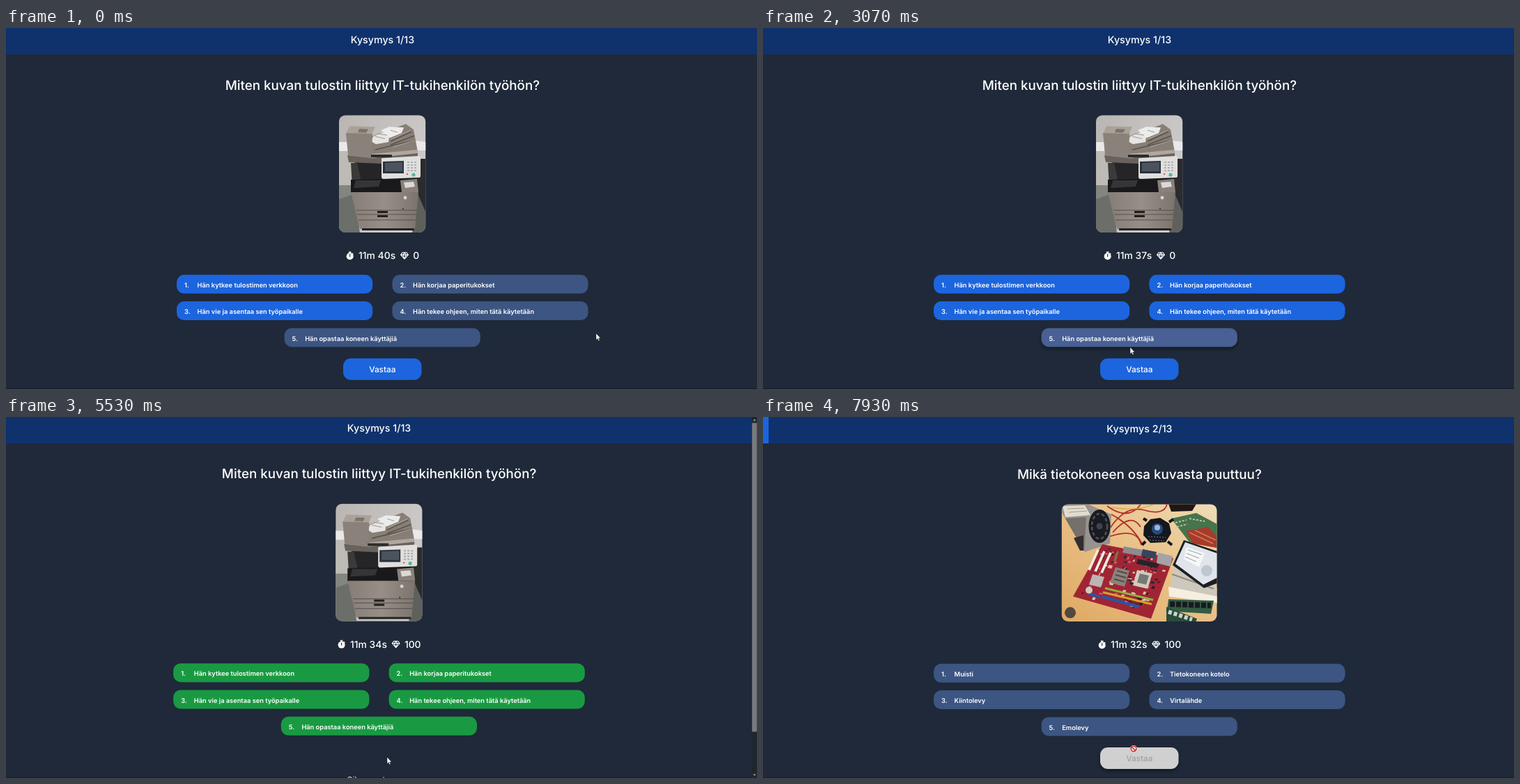
Recreate the animation shown at these times as an HTML page. Size 1078 by 519 pixels, loop 8000 ms.

```html
<!DOCTYPE html>
<html lang="fi">
<head>
<meta charset="utf-8">
<title>Kysymys</title>
<style>
  html, body { margin: 0; width: 100%; height: 100%; overflow: hidden; background: #1f2939; }
  svg { display: block; width: 100%; height: 100%; }
  text { font-family: Inter, "Open Sans", sans-serif; font-weight: 500; fill: #fff; text-rendering: geometricPrecision; }
  .mid { text-anchor: middle; }
  .opt { font-size: 9.28px; font-weight: 600; }
  .stat { font-size: 13.9px; }
</style>
</head>
<body>
<svg id="stage" viewBox="0 0 1078 519">
  <defs>
    <filter id="soft" x="-20%" y="-60%" width="140%" height="240%"><feGaussianBlur stdDeviation="2.8"/></filter>
    <clipPath id="clipA"><rect x="478" y="125.4" width="124.2" height="168.6" rx="9"/></clipPath>
    <clipPath id="clipB"><rect x="428.8" y="125.4" width="222.7" height="168.6" rx="9"/></clipPath>
    <linearGradient id="wall" x2="1" y2=".6"><stop stop-color="#b9b5b2"/><stop offset="1" stop-color="#cfcdcc"/></linearGradient>
    <linearGradient id="case" x2="1"><stop stop-color="#857d76"/><stop offset=".5" stop-color="#978f87"/><stop offset="1" stop-color="#7b746d"/></linearGradient>
    <linearGradient id="wood" x2="1" y1="1" y2="0"><stop stop-color="#dfa862"/><stop offset=".6" stop-color="#eac48d"/><stop offset="1" stop-color="#efdcb6"/></linearGradient>
  </defs>

  <rect width="1078" height="519" fill="#1f2939"/>
  <rect y="518" width="1078" height="1" fill="#151c28"/>
  <rect width="1078" height="38" fill="#0f326d"/>
  <rect id="progress" height="38" fill="#1c65de"/>

  <g id="page">
    <text id="head" class="mid" x="540.4" y="22" font-size="14.25"/>
    <text id="title" class="mid" x="540.4" y="89" font-size="18.8"/>

    <g id="photoA" clip-path="url(#clipA)">
      <rect x="478" y="125" width="125" height="170" fill="url(#wall)"/>
      <path d="M478 164h14v13h-14zM588 162l15 2v12h-15z" fill="#e9e9ea"/>
      <path d="M478 178h22v50h-22z" fill="#bebab6"/>
      <path d="M478 226h22l8 69h-30z" fill="#6c6f69"/>
      <path d="M589 236h14v59h-20z" fill="#5f605c"/>
      <path d="M478 226h20l3 12-23 8z" fill="#838680"/>
      <path d="M594 188h9v78l-13-30z" fill="#2b2b2e"/>
      <path d="M501 190h92l-2 48h-93z" fill="#252527"/>
      <path d="M495 194h9l5 22-12 12z" fill="#3c3a39"/>
      <path d="M524 156l50-18 11 8 6 32-66 8z" fill="#877f76"/>
      <path d="M552 163l30-14M552 168l34-13M530 175l58-14" stroke="#59534d" stroke-width="1.6"/>
      <path d="M552 160l29-13M556 171l32-10" stroke="#b1a99f"/>
      <path d="M527 156l14-6 10 2-2 12-18 3-7-4z" fill="#e6e5e3"/>
      <path d="M538 147l12-5 21 1-3 8-17 7z" fill="#ececea"/>
      <path d="M530 156l14 3M533 152l14 2M552 147l10 3" stroke="#9b9894" fill="none"/>
      <path d="M493 141l37 1-5 11-37-1z" fill="#aaa198"/>
      <path d="M507 145l13 .5-3 5-12-.5z" fill="#7b746d"/>
      <path d="M488 151l38 1-1 35-34-4z" fill="#8a827a"/>
      <path d="M525 181l66-6v5l-66 7z" fill="#b0a89e"/>
      <path d="M490 183l35 4 66-7v6l-52 6v3l-47-2z" fill="#69625c"/>
      <path d="M524 182h30v4h-30z" fill="#2d2c2c"/>
      <path d="M495 218l92-2 5 21h-97z" fill="#19191b"/>
      <path d="M502 219l36 0-3 9-36 2z" fill="#353537"/>
      <path d="M495 236h97l-5 53h-79z" fill="url(#case)"/>
      <path d="M566 219l24-2 2 19h-24z" fill="#898179"/>
      <path d="M571 222l14-1 2 7-14 2z" fill="#dad9d8"/>
      <path d="M503 262h87M504 268h85M506 276h82" stroke="#514b47" stroke-width=".9"/>
      <path d="M533 263h15v3h-15zM533 269h15v3h-15z" fill="#1f1e1e"/>
      <path d="M511 288h75v3h-75z" fill="#242424"/>
      <circle cx="573" cy="244" r="2.4" fill="#d8d5d1"/>
      <circle cx="570" cy="260" r="1.1" fill="#333"/>
      <path d="M539 188q0-1 2-1l51-3q3 0 3 2v27q0 2-2 2l-51 2q-3 0-3-3z" fill="#e0dfde"/>
      <path d="M541 192l30-1v18h-30z" fill="#2c323b"/>
      <path d="M544 194l25-1v13h-25z" fill="#4b535e"/>
      <path d="M576 193h13M576 197h13M576 201h13M576 205h13" stroke="#a3a3a4" stroke-width="1.6" stroke-dasharray="3 2"/>
      <circle cx="585" cy="211" r="2.6" fill="#52b999"/>
      <circle cx="576" cy="210" r="1.2" fill="#c66c5a"/>
    </g>

    <g id="photoB" clip-path="url(#clipB)">
      <rect x="428" y="125" width="225" height="170" fill="url(#wood)"/>
      <path d="M582 125h40l-6 10-30 1z" fill="#1f1715"/>
      <g fill="none" stroke="#b3302a" stroke-width="1.8">
        <path d="M494 128q30 22 48-2M498 160q22-34 50-26t32-9M497 172q40-14 46 12M500 140q30 16 44 42M502 166q26-30 40-8"/>
        <path d="M500 130q34 6 60-4" stroke="#d3a53e" stroke-width="1.2"/>
      </g>
      <path d="M428 126h40l32 14-2 42-36 12-34-58z" fill="#97938f"/>
      <path d="M430 128l32-1 8 14-36 3z" fill="#e2dccf"/>
      <path d="M437 132l24-1M439 137l26-2" stroke="#a39a8c"/>
      <path d="M434 146l30-2-3 49z" fill="#776f69"/>
      <path d="M446 174l14-4v22h-5z" fill="#332e2e"/>
      <ellipse cx="483" cy="157" rx="15.5" ry="24" fill="#191b20"/>
      <ellipse cx="483" cy="157" rx="11" ry="18" fill="none" stroke="#4b505a" stroke-width="2.5" stroke-dasharray="5 3"/>
      <circle cx="483" cy="157" r="4.5" fill="#3e434d"/>
      <path d="M586 146l36-8 30 16v34l-40-8z" fill="#47744c"/>
      <path d="M592 152l16-4M594 158l15-4M612 146l22 4" stroke="#b9c4a0" stroke-width="2" stroke-dasharray="3 2"/>
      <path d="M607 164l32-6 12 14v16l-34-6z" fill="#a83a2b"/>
      <path d="M612 166l34 16M620 163l30 14" stroke="#d17a56" stroke-width="1.5"/>
      <path d="M547 157l9-10 14-2 13 8 3 14-8 13-22 1-10-11z" fill="#14171d"/>
      <path d="M551 149l-5-3M583 151l6-4M549 179l-5 5M581 179l6 5" stroke="#14171d" stroke-width="4"/>
      <circle cx="566" cy="161" r="8" fill="#264a80"/>
      <circle cx="566" cy="159" r="4" fill="#9fb6cd"/>
      <path d="M553 172l25 1M555 177l21 1" stroke="#5a5f68" stroke-width="1.5" stroke-dasharray="2 2"/>
      <path d="M592 211l60 34v24l-70-11z" fill="#cdc8be"/>
      <path d="M587 226l60 21" stroke="#958b7c" stroke-width="2"/>
      <path d="M582 244l70 14v9l-69-9z" fill="#f6efdf"/>
      <path d="M604 177l48 16v46l-19 7-45-33z" fill="#1b1f25"/>
      <path d="M606 180l46 16v35l-20 10-40-30z" fill="#dfe5ea"/>
      <path d="M608 187l26 9-8 20-22-12z" fill="#f6f7f7"/>
      <path d="M610 191l20 7M608 196l18 7M606 201l16 7" stroke="#a1a8af" stroke-width="1.2"/>
      <circle cx="637" cy="221" r="8" fill="#bec7cf"/>
      <path d="M487 183l102 20-32 87-112-32z" fill="#a02534"/>
      <g id="parts" transform="matrix(1.02 .2 -.37 .79 487 183)"></g>
      <g stroke="#f1ece1" stroke-width="3.6">
        <path d="M481 191l-13 29M490 193l-13 29M499 195l-13 29"/>
        <path d="M509 193l-4 14" stroke="#8d6b43"/>
      </g>
      <path d="M518 186l27 5-2 9-27-5z" fill="#8f8990"/>
      <path d="M545 190l20 4-2 10-20-4z" fill="#36435e"/>
      <path d="M567 195l21 5-3 15-20-5z" fill="#a4a3a5"/>
      <path d="M538 204l28 6-2 7-28-6z" fill="#27242b"/>
      <path d="M506 216l20 5-7 23-21-6z" fill="#8c8179"/>
      <path d="M508 221l15 4M506 227l15 4M504 233l15 4" stroke="#524a49" stroke-width="2"/>
      <path d="M537 220l22 5-7 22-21-5z" fill="#d3cbbb"/>
      <path d="M541 225l13 3-4 13-13-3z" fill="#777"/>
      <path d="M473 226l17 4-5 15-17-4z" fill="#bcb5b1"/>
      <path d="M491 246l69 17" stroke="#8fb33c" stroke-width="3"/>
      <path d="M488 252l70 17" stroke="#d6a12e" stroke-width="3"/>
      <path d="M486 258l54 15M468 254l16 5" stroke="#2856a7" stroke-width="4"/>
      <circle cx="468" cy="249" r="5" fill="#cfcbc5"/>
      <path d="M582 262l65 2-4 19-63-4z" fill="#335b43"/>
      <path d="M584 269l59 2" stroke="#171a1d" stroke-width="8" stroke-dasharray="7 2"/>
      <path d="M579 273l44 17-2 5h-42z" fill="#294c3b"/>
      <path d="M582 280l34 11" stroke="#cbd3d0" stroke-width="6" stroke-dasharray="5 3"/>
      <circle cx="441" cy="281.3" r="8" fill="#51483f"/>
    </g>

    <g id="watch">
      <circle cx="5.6" cy="328.2" r="5" fill="#fff"/>
      <path d="M3.8 321.4h3.6v1.5h-3.6zM4.9 322h1.4v2h-1.4zM9 323.2l1.8 1.7-1 1-1.8-1.7z" fill="#fff"/>
      <path d="M5.6 325.4v3.2" stroke="#1f2939" stroke-width="1.2" stroke-linecap="round"/>
    </g>
    <text id="clock" class="stat" y="332.4"/>
    <path id="gem" d="M3 322.8h6l2.4 3.3-5.4 6.1-5.4-6.1zM.6 326.1h10.8M3.8 326.1l2.2 6 2.2-6L6 322.9z" fill="none" stroke="#fff" stroke-width="1.1" stroke-linejoin="round"/>
    <text id="score" class="stat" y="332.4"/>
    <g id="pills"></g>
    <g id="button">
      <rect id="btnShade" x="484" y="478" width="112.5" height="31" rx="11" filter="url(#soft)"/>
      <rect id="btnFace" x="484" y="475" width="112.5" height="31" rx="11"/>
      <text id="btnText" class="mid" x="540.3" y="495" font-size="11.8"/>
    </g>
    <text id="note" class="mid" x="531" y="525.8" font-size="11" opacity=".8">Oikea vastaus</text>
  </g>

  <g id="scroll">
    <rect x="1070.5" width="7.5" height="519" fill="#20262e"/>
    <rect x="1070.8" y="8.5" width="7" height="444" fill="#777a7f"/>
    <path d="M1072.2 5.6l2.2-2.6 2.2 2.6zM1072.2 513.4l2.2 2.6 2.2-2.6z" fill="#a0a0a2"/>
  </g>

  <g id="cursor">
    <path id="arrow" d="M0 0v9.4l2.1-1.9 1.4 3.2 1.6-.7-1.4-3.1h2.8z" fill="#fff" stroke="#111" stroke-width=".45"/>
    <path id="beam" d="M-1.5-4.2h3M0-4.2v8.4M-1.5 4.2h3" fill="none" stroke="#d9deea" stroke-width=".8"/>
    <g id="block" fill="none">
      <circle r="3.8" fill="#f3e9e9" stroke="#fff" stroke-width="2.4"/>
      <path d="M-3.8 0a3.8 3.8 0 1 0 7.6 0a3.8 3.8 0 1 0-7.6 0M-2.7-2.7L2.7 2.7" stroke="#c4202c" stroke-width="1.5"/>
    </g>
  </g>
</svg>

<script>
const LOOP = 8000, REVEAL = 4800, NEXT = 7730;
const IDLE = [60, 85, 130], LIFT = [72, 96, 148], BLUE = [28, 101, 222],
      BLUE_LIFT = [34, 104, 220], GREEN = [25, 154, 66], GREY = [208, 208, 208];

const ui = {};
document.querySelectorAll('#stage [id]').forEach(n => ui[n.id] = n);

const ramp = (t, from, len) => Math.min(1, Math.max(0, (t - from) / len));
const mix = (a, b, k) => a.map((v, i) => v + (b[i] - v) * k);
const rgb = c => `rgb(${c.map(Math.round)})`;
const show = (node, on) => node.setAttribute('display', on ? 'inline' : 'none');
const shift = (node, x, y = 0) => node.setAttribute('transform', `translate(${x} ${y})`);
const write = (node, s) => { if (node.textContent !== s) node.textContent = s; };

function add(parent, tag, attrs) {
  const node = document.createElementNS('http://www.w3.org/2000/svg', tag);
  for (const k in attrs) node.setAttribute(k, attrs[k]);
  return parent.appendChild(node);
}

// small components scattered over the circuit board
let seed = 7;
const rand = () => (seed = seed * 16807 % 2147483647) / 2147483647;
const tones = ['#3a1a22', '#d9c9bd', '#64202c', '#c9596a', '#2c2a33', '#e0b9a8'];
for (let i = 0; i < 130; i++) {
  add(ui.parts, 'rect', { x: 3 + rand() * 91, y: 4 + rand() * 90,
    width: 1.5 + rand() * 4, height: 1.5 + rand() * 4, fill: tones[i % tones.length] });
}

const pages = [
  { title: 'Miten kuvan tulostin liittyy IT-tukihenkilön työhön?',
    options: ['Hän kytkee tulostimen verkkoon', 'Hän korjaa paperitukokset',
      'Hän vie ja asentaa sen työpaikalle', 'Hän tekee ohjeen, miten tätä käytetään',
      'Hän opastaa koneen käyttäjiä'] },
  { title: 'Mikä tietokoneen osa kuvasta puuttuu?',
    options: ['Muisti', 'Tietokoneen kotelo', 'Kiintolevy', 'Virtalähde', 'Emolevy'] }
];

// picked: time of selection; hover: time the pointer enters and leaves
const pills = [
  { x: 245, y: 354.8, picked: -500, hover: [600, 1170] },
  { x: 554.4, y: 354.8, picked: 1670, hover: [1200, 1930] },
  { x: 245, y: 393.1, picked: -500 },
  { x: 554.4, y: 393.1, picked: 2080, hover: [1990, 2200] },
  { x: 399.6, y: 431.4, picked: 3090, hover: [2290, 3160] }
];
pills.forEach((p, i) => {
  const box = { x: p.x, width: 281.2, height: 27, rx: 10.5 };
  p.shade = add(ui.pills, 'rect', { ...box, y: p.y + 3, filter: 'url(#soft)' });
  p.face = add(ui.pills, 'rect', { ...box, y: p.y });
  const num = add(ui.pills, 'text', { class: 'opt', x: p.x + 11, y: p.y + 18.2 });
  num.textContent = `${i + 1}.`;
  p.label = add(ui.pills, 'text', { class: 'opt', x: p.x + 29.6, y: p.y + 18.2 });
});

// pointer stops: time, x, y
const path = [
  [0, 847, 439], [70, 847, 439], [530, 256, 364], [670, 262, 366], [1000, 380, 367],
  [1200, 629, 369], [1330, 655, 367], [1470, 655, 367], [1530, 662, 366], [1900, 662, 366],
  [2050, 640, 404], [2150, 640, 404], [2470, 528, 458], [2530, 527, 459], [3070, 527, 459],
  [3600, 547, 489], [5870, 547, 489], [5930, 547, 490], [6330, 547, 490], [6530, 546, 491],
  [6900, 546, 491], [7530, 538, 488], [7670, 538, 488], [7930, 532, 477], [LOOP, 532, 477]
];

function pointer(t) {
  const i = path.findIndex(p => p[0] > t);
  const a = path[i - 1], b = path[i];
  return mix(a, b, ramp(t, a[0], b[0] - a[0])).slice(1);
}

function drawPills(t, page) {
  const solved = ramp(t, REVEAL - 20, 150), cleared = ramp(t, NEXT, 150);
  pills.forEach((p, i) => {
    const over = p.hover ? ramp(t, p.hover[0], 130) * (1 - ramp(t, p.hover[1], 150)) : 0;
    let c = mix(mix(IDLE, LIFT, over), mix(BLUE, BLUE_LIFT, over), ramp(t, p.picked, 150));
    c = mix(mix(c, GREEN, solved), IDLE, cleared);
    p.face.setAttribute('fill', rgb(c));
    p.shade.setAttribute('opacity', .38 * over);
    write(p.label, page.options[i]);
  });
}

function drawStats(t) {
  write(ui.clock, `11m ${40 - Math.floor((t + 470) / 1000)}s`);
  write(ui.score, t < 3800 ? '0' : '100');
  const w = ui.clock.getComputedTextLength(), v = ui.score.getComputedTextLength();
  let x = 540.6 - (w + v + 43) / 2;
  shift(ui.watch, x);
  ui.clock.setAttribute('x', x += 18);
  shift(ui.gem, x += w + 6.8);
  ui.score.setAttribute('x', x + 18.2);
}

function drawButton(t) {
  const next = t >= NEXT, k = ramp(t, NEXT, 150);
  const alpha = t < REVEAL ? (1 - ramp(t, 3800, 400)) ** 2 : ramp(t, 6760, 450);
  ui.button.setAttribute('opacity', alpha);
  ui.btnFace.setAttribute('fill', rgb(mix(BLUE, GREY, k)));
  ui.btnShade.setAttribute('opacity', .4 * ramp(t, 7590, 120));
  ui.btnText.style.fill = rgb(mix([255, 255, 255], [160, 161, 163], k));
  write(ui.btnText, t >= REVEAL && !next ? 'Seuraava' : 'Vastaa');
}

function drawCursor(t) {
  const kind = t >= NEXT ? 'block' : t > 900 && t < 2300 ? 'beam' : 'arrow';
  ['arrow', 'beam', 'block'].forEach(k => show(ui[k], k === kind));
  shift(ui.cursor, ...pointer(t));
}

function draw(t) {
  const n = t >= NEXT ? 1 : 0, long = t >= REVEAL && !n;
  write(ui.head, `Kysymys ${n + 1}/13`);
  write(ui.title, pages[n].title);
  show(ui.photoA, !n);
  show(ui.photoB, n);
  show(ui.scroll, long);
  show(ui.note, long);
  shift(ui.page, long ? -4.8 : 0, long ? -.6 : 0);
  ui.progress.setAttribute('width', 8 * (Math.max(0, t - NEXT) / 200) ** 1.5);
  drawPills(t, pages[n]);
  drawStats(t);
  drawButton(t);
  drawCursor(t);
}

const start = performance.now();
function tick() {
  draw((performance.now() - start) % LOOP);
  requestAnimationFrame(tick);
}
tick();
</script>
</body>
</html>
```
